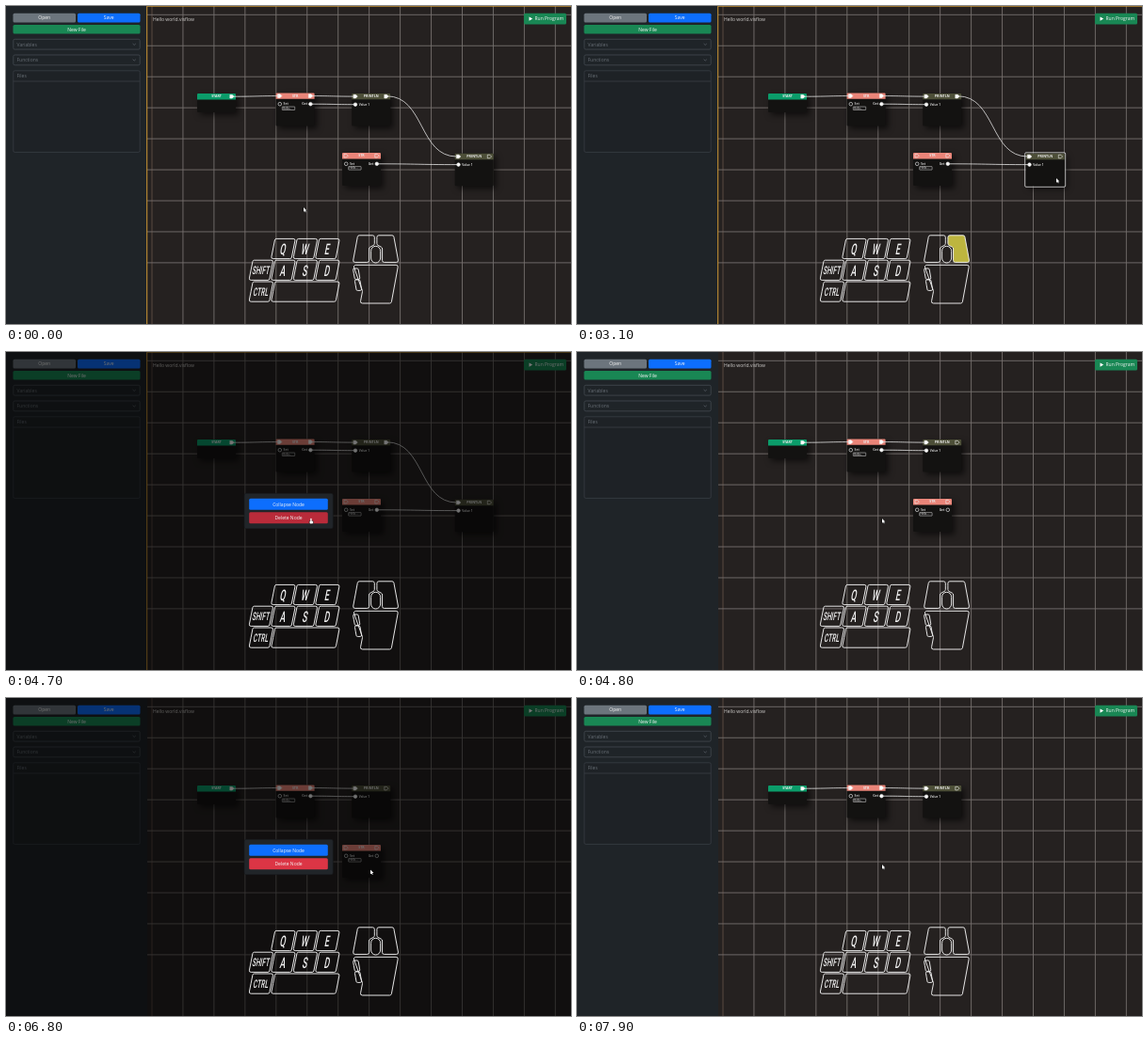
An HTML page with a canvas for the animation above (8000 ms loop, 600 by 338 pixels).

```html
<!DOCTYPE html>
<html lang="en">
<head>
<meta charset="utf-8">
<title>Node editor</title>
<style>
html, body { margin: 0; width: 100%; height: 100%; overflow: hidden; background: #252120; }
canvas { display: block; width: 600px; height: 338px; }
</style>
</head>
<body>
<canvas id="stage"></canvas>
<script>
const W = 600, H = 338, LOOP = 8000, STEP = 100;
const UI = '"Open Sans", "Noto Sans", sans-serif';
const INK = '#f0f0f0';
const canvas = document.getElementById('stage');
const ctx = canvas.getContext('2d');
const dpr = window.devicePixelRatio || 1;
canvas.width = W * dpr;
canvas.height = H * dpr;

const between = (v, a, b) => v >= a && v < b;
const mix = (a, b, u) => a + (b - a) * u;

const spots = {
  rest: { x: 316, y: 214 },
  print: { x: 509, y: 183 },
  remove: { x: 324, y: 177 },
  str: { x: 387, y: 182.5 }
};
const moves = [
  { from: 1700, to: 2600, spot: spots.print },
  { from: 3200, to: 3900, spot: spots.remove },
  { from: 6000, to: 6300, spot: spots.str },
  { from: 6800, to: 7300, spot: spots.remove }
];

function cursorAt(t) {
  let { x, y } = spots.rest;
  for (const { from, to, spot } of moves) {
    const u = Math.min(1, Math.max(0, (t - from) / (to - from)));
    const e = 1 - Math.pow(1 - u, 1.4);
    x = mix(x, spot.x, e);
    y = mix(y, spot.y, e);
  }
  return { x, y };
}

const PRINT_GONE = 4800, STR_GONE = 7900;
const modalOpen = t => between(t, 3200, PRINT_GONE) || between(t, 6800, STR_GONE);
const rightDown = t => between(t, 3100, 3200) || between(t, 6500, 6800);
const onDelete = c => between(c.x, 258, 342) && between(c.y, 170, 182);

function paint(fill, stroke, lw) {
  if (fill) { ctx.fillStyle = fill; ctx.fill(); }
  if (stroke) { ctx.strokeStyle = stroke; ctx.lineWidth = lw; ctx.stroke(); }
}

function box(x, y, w, h, r, fill, stroke, lw = 0.7) {
  ctx.beginPath();
  ctx.roundRect(x, y, w, h, r);
  paint(fill, stroke, lw);
}

function line(color, lw, ...pts) {
  ctx.beginPath();
  pts.forEach(p => ctx.lineTo(...p));
  paint(null, color, lw);
}

function poly(pts, fill, stroke, lw) {
  ctx.beginPath();
  pts.forEach(p => ctx.lineTo(...p));
  ctx.closePath();
  paint(fill, stroke, lw);
}

// Closed outline with rounded corners
function roundPoly(pts, r, fill) {
  const n = pts.length, last = pts[n - 1];
  ctx.beginPath();
  ctx.moveTo((last[0] + pts[0][0]) / 2, (last[1] + pts[0][1]) / 2);
  pts.forEach((p, i) => ctx.arcTo(...p, ...pts[(i + 1) % n], r));
  ctx.closePath();
  paint(fill, INK, 0.95);
}

// Slab whose lower edge is moved sideways by `lean`
const slab = (x, y, w, h, lean) => [[x, y], [x + w, y], [x + w + lean, y + h], [x + lean, y + h]];

function text(s, x, y, size, color, align = 'left', weight = 400) {
  ctx.font = `${weight} ${size}px ${UI}`;
  ctx.fillStyle = color;
  ctx.textAlign = align;
  ctx.fillText(s, x, y + size * 0.36);
}

function button(label, x, y, w, h, color) {
  box(x, y, w, h, 1.5, color);
  text(label, x + w / 2, y + h / 2, 5, '#f4f4f4', 'center');
}

function drawGrid() {
  const cell = 32.95, color = '#77716f';
  ctx.fillStyle = '#252120';
  ctx.fillRect(150, 0, W - 150, H);
  for (let x = 155; x < W; x += cell) line(x > 155 ? color : '#604e46', 0.9, [x, 0], [x, H]);
  for (let y = 9.3; y < H - cell; y += cell) line(color, 0.9, [150, y], [W, y]);
}

function drawSidebar() {
  ctx.fillStyle = '#1f2428';
  ctx.fillRect(0, 0, 150, H);
  button('Open', 7.5, 7.8, 66.5, 9.6, '#6c757d');
  button('Save', 76, 7.8, 66.5, 9.6, '#0d6efd');
  button('New File', 7.5, 20, 135, 9.6, '#198754');
  ['Variables', 'Functions'].forEach((s, i) => {
    const y = 35.3 + 16.7 * i;
    box(7.8, y, 134.4, 10.8, 1.5, null, '#495057');
    text(s, 11.5, y + 5.4, 5, '#697077');
    line('#697077', 0.6, [134.6, y + 4.7], [136.2, y + 6.2], [137.8, y + 4.7]);
  });
  box(7.8, 68.8, 134.4, 86.6, 1.5, '#1e2226', '#3d4349');
  line('#3d4349', 0.7, [7.8, 80], [142.2, 80]);
  text('Files', 11.5, 74.5, 5, '#697077');
}

function drawTopbar() {
  text('Hello world.visflow', 156, 13.8, 5, '#d0cecc');
  box(550, 7.8, 45, 11.6, 1.5, '#198754');
  poly([[555.5, 11.5], [559.2, 13.6], [555.5, 15.7]], '#fff');
  text('Run Program', 561.5, 13.6, 5, '#f4f4f4');
}

function execPin(x, y, on) {
  poly([[x - 2, y - 1.8], [x + 0.5, y - 1.8], [x + 2.3, y], [x + 0.5, y + 1.8], [x - 2, y + 1.8]],
    on ? '#fff' : null, '#eee', 0.6);
}

function dataPin(x, y, on) {
  ctx.beginPath();
  ctx.arc(x, y, 1.8, 0, 7);
  paint(on ? '#fff' : '#111', '#eee', 0.65);
}

function nodeFrame(label, x, y, h, color, hover) {
  ctx.save();
  ctx.shadowColor = 'rgba(0,0,0,.6)';
  ctx.shadowBlur = 6 * dpr;
  ctx.shadowOffsetX = ctx.shadowOffsetY = 3 * dpr;
  box(x, y, 41, h, 1, '#131211');
  ctx.restore();
  box(x, y, 41, 6.4, [1, 1, 0, 0], color);
  text(label, x + 20.5, y + 3.2, 3.6, '#eee', 'center', 700);
  if (hover) box(x - 1, y - 1, 43, h + 2, 1.2, null, '#dcdcdc', 0.8);
}

function startNode(x, y) {
  nodeFrame('START', x, y, 20, '#0b9c6a');
  execPin(x + 36.8, y + 3.2, true);
}

function strNode(x, y, execOn, getOn, hover) {
  nodeFrame('STR', x, y, 35, '#ea8579', hover);
  execPin(x + 4, y + 3.2, execOn);
  execPin(x + 36.8, y + 3.2, execOn);
  dataPin(x + 4.2, y + 11.8, false);
  dataPin(x + 36.8, y + 11.8, getOn);
  text('Set', x + 8, y + 11.8, 3.4, '#eee', 'left', 600);
  text('Get', x + 33.4, y + 11.8, 3.4, '#eee', 'right', 600);
  box(x + 6.7, y + 14.6, 13.4, 3.5, 0.3, '#181717', '#ddd', 0.5);
  text('Hello...', x + 7.5, y + 16.4, 2.8, '#eee');
}

function printNode(x, y, outOn, hover) {
  nodeFrame('PRINTLN', x, y, 34.5, '#4d4f38', hover);
  execPin(x + 3.8, y + 3.2, true);
  execPin(x + 36.6, y + 3.2, outOn);
  dataPin(x + 3.8, y + 11.8, true);
  text('Value 1', x + 7.6, y + 11.8, 3.2, '#eee', 'left', 600);
}

function wire(x1, y1, x2, y2) {
  const d = (x2 - x1) * 0.54;
  ctx.beginPath();
  ctx.moveTo(x1, y1);
  ctx.bezierCurveTo(x1 + d, y1, x2 - d, y2, x2, y2);
  paint(null, '#e4e4e4', 0.8);
}

function drawGraph(t, cur) {
  const hasPrint = t < PRINT_GONE, hasStr = t < STR_GONE, modal = modalOpen(t);
  const over = (x, y) => !modal && between(cur.x, x, x + 41) && between(cur.y, y, y + 35);
  startNode(203, 93);
  strNode(286.6, 92.4, true, true);
  printNode(367.2, 92.9, hasPrint);
  if (hasStr) strNode(357, 156, false, hasPrint, over(357, 156));
  if (hasPrint) printNode(476.7, 156.8, false, over(476.7, 156.8));
  wire(241, 96.2, 290, 95.6);
  wire(325, 95.6, 370, 96.1);
  wire(323.4, 104.2, 371, 104.7);
  if (hasPrint) {
    wire(404.5, 95.8, 478.5, 160);
    wire(393.8, 167.8, 480.5, 168.6);
  }
}

function drawModal(cur) {
  ctx.fillStyle = 'rgba(0,0,0,.54)';
  ctx.fillRect(0, 0, W, H);
  box(253, 150.3, 94.3, 37.4, 2, '#212529', '#17191b', 0.6);
  button('Collapse Node', 258.2, 155.8, 83.6, 12, '#0d6efd');
  button('Delete Node', 258.2, 170.2, 83.6, 12, onDelete(cur) ? '#b92b3a' : '#dc3545');
}

function key(label, x, y, w) {
  const h = 21.2, lean = -4.2, size = label.length > 1 ? 12 : 16;
  roundPoly(slab(x - lean, y, w + lean, h, lean), 1.8);
  ctx.save();
  ctx.translate(x + w / 2, y + h / 2);
  ctx.transform(0.55, 0, -0.2, 1, 0, 0);
  ctx.font = `500 ${size}px Roboto, "Liberation Sans", sans-serif`;
  ctx.textAlign = 'center';
  ctx.fillStyle = INK;
  ctx.fillText(label, 0, size * 0.36);
  ctx.restore();
}

function drawKeyboard() {
  const left = 258, top = 247.4, dx = 23.5, dy = 22.8, w = 25.8;
  ['QWE', 'ASD'].forEach((row, r) =>
    [...row].forEach((c, i) => key(c, left + dx * (i + 1), top + dy * r, w)));
  ['SHIFT', 'CTRL'].forEach((s, i) => key(s, left, top + dy * (i + 1), w));
  key('', left + dx, top + dy * 2, w + dx * 2);
}

function drawMouse(pressed) {
  const mid = 392.6, top = 243.8, seam = 272.4, wheel = 5;
  const half = [[1.3, top], [19, top], [24.3, seam], [wheel + 2, seam], [wheel + 2, top + 13], [1.3, top + 10]];
  [-1, 1].forEach(s =>
    roundPoly(half.map(([x, y]) => [mid + s * x, y]), 2, pressed && s > 0 ? '#bdb53f' : null));
  box(mid - wheel, top + 11.5, wheel * 2, 17.7, wheel, null, INK, 0.95);
  roundPoly([[mid - 24, 275.3], [mid + 24, 275.3], [mid + 16.5, 316], [mid - 16.5, 316], [mid - 14, 303]], 2);
  [279, 291].forEach((y, i) => roundPoly(slab(368.4 + i * 1.8, y, 5.6, 11.4, 2), 1.3));
}

function drawCursor({ x, y }, hand) {
  ctx.save();
  ctx.translate(x, y);
  ctx.lineJoin = 'round';
  if (hand) {
    box(-1.8, 2.2, 4.2, 3.6, 1.2, '#fff', '#000', 0.6);
    box(-0.7, -0.2, 1.3, 4, 0.6, '#fff');
  } else {
    const arrow = [[0, 0], [0, 4.8], [1.2, 3.9], [2, 5.4], [2.7, 5], [2, 3.5], [3.5, 3.4]];
    poly(arrow, null, '#000', 0.9);
    poly(arrow, '#fff');
  }
  ctx.restore();
}

function draw(t) {
  const cur = cursorAt(t), modal = modalOpen(t);
  ctx.setTransform(dpr, 0, 0, dpr, 0, 0);
  drawGrid();
  drawGraph(t, cur);
  drawSidebar();
  drawTopbar();
  if (t < PRINT_GONE) line('#cf9836', 1, [149.7, H], [149.7, 0.2], [W, 0.2]);
  if (modal) drawModal(cur);
  drawKeyboard();
  drawMouse(rightDown(t));
  drawCursor(cur, modal && onDelete(cur));
}

function tick(now) {
  draw(Math.floor((now % LOOP) / STEP) * STEP);
  requestAnimationFrame(tick);
}
requestAnimationFrame(tick);
</script>
</body>
</html>
```
